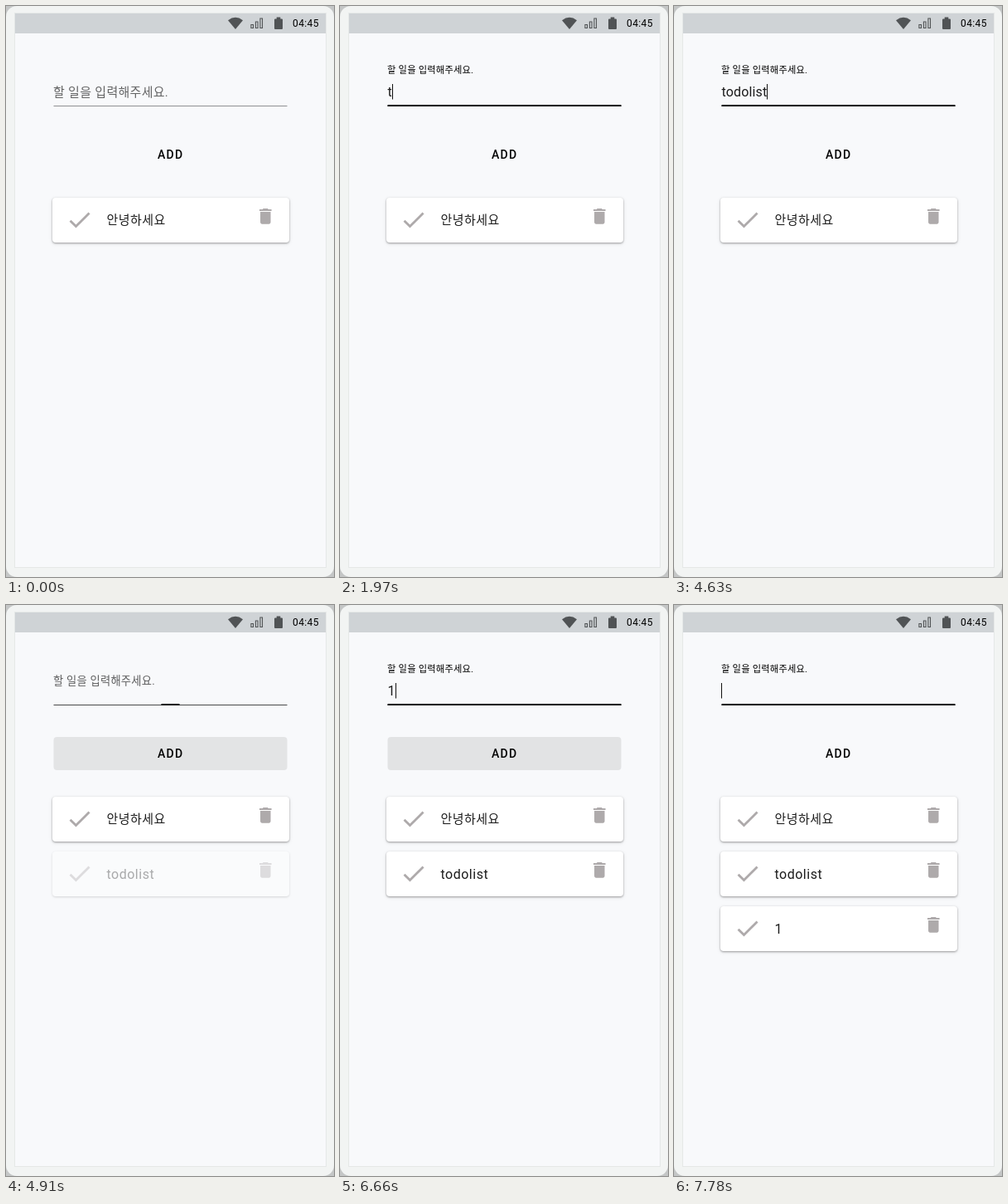
Write an HTML page that moves like this. It is 396x688 px and loops after 8000 ms.

```html
<!DOCTYPE html>
<html lang="ko">
<head>
<meta charset="utf-8">
<title>Todo app</title>
<style>
  html, body { margin: 0; width: 100%; height: 100%; overflow: hidden; background: #c4c6c6; }
  svg { display: block; }
  text { font-family: Roboto, "Noto Sans CJK KR", "Noto Sans CJK", sans-serif; fill: #000; white-space: pre; }
  .card { fill: #fff; filter: drop-shadow(0 1px 1px rgba(0,0,0,.32)) drop-shadow(0 1px 2px rgba(0,0,0,.1)); }
  .icon { fill: #aeaaab; }
  .item { font-size: 16px; letter-spacing: .5px; fill: #1c1c1c; }
  .ko { font-size: 15px; letter-spacing: .45px; }
</style>
</head>
<body>
<svg width="396" height="688" viewBox="0 0 396 688">
  <rect width="396" height="688" rx="13" fill="#f2f4f3"/>
  <rect x="10.5" y="8.5" width="376" height="668" fill="#f8f9fb" stroke="#e5e8e7"/>
  <rect x="11" y="9" width="375" height="24" fill="#cfd3d6"/>

  <g fill="#505355">
    <path d="M277 28 L268 17.2 Q277 10.4 286 17.2 Z"/>
    <path d="M325 15.5 Q324 15.5 324 16.5 V27 Q324 28 325 28 H333 Q334 28 334 27 V16.5 Q334 15.5 333 15.5 H331.3 V13.5 H326.7 V15.5 Z"/>
    <path d="M295.9 22.5 h2.6 v4 h-2.6z M301.4 19 h2.6 v7.5 h-2.6z M306.9 15 h2.6 v11.5 h-2.6z" fill="none" stroke="#505355" stroke-width="1.1"/>
  </g>
  <text x="346" y="25" font-size="12" letter-spacing=".4">04:45</text>

  <text id="label" font-size="15" letter-spacing=".29">할 일을 입력해주세요.</text>
  <text id="value" x="57.5" y="108.5" font-size="16" letter-spacing=".15" style="fill:#1c1c1c"></text>
  <rect id="caret" y="94" width="1" height="18.5" fill="#111"/>
  <rect id="base" x="57.5" y="120" width="282" height="1"/>
  <rect id="line" y="119" height="2"/>

  <rect id="shade" x="57.5" y="159" width="282" height="40" rx="4"/>
  <text x="183" y="184" font-size="14" font-weight="500" letter-spacing="1.25">ADD</text>

  <g id="list"></g>
</svg>
<script>
const LOOP = 8000, STEP = 70, PHASE = 10;
const $ = id => document.getElementById(id);
const clamp = v => Math.max(0, Math.min(1, v));
const mix = (a, b, k) => a + (b - a) * k;
const set = (el, attrs) => { for (const k in attrs) el.setAttribute(k, attrs[k]); };

function bezier(x1, y1, x2, y2) {
  const at = (a, b, u) => 3 * (1 - u) * (1 - u) * u * a + 3 * (1 - u) * u * u * b + u * u * u;
  return x => {
    if (x <= 0 || x >= 1) return clamp(x);
    let lo = 0, hi = 1;
    for (let i = 0; i < 24; i++) {
      const mid = (lo + hi) / 2;
      if (at(x1, x2, mid) < x) lo = mid; else hi = mid;
    }
    return at(y1, y2, lo);
  };
}
const easeOut = bezier(0, 0, .2, 1);
const ease = bezier(.25, .1, .25, 1);

// Times alternate on, off, on ...
const FOCUS = [490, 4782, 5682, 6830, 7575];
const FLOAT = [490, 4865, 5682, 6913, 7575];
const CARET = [490, 1480, 1550, 2810, 2880, 4070, 4630, 4780, 5682, 6240, 6310, 6830, 7575];
const TYPED = [
  [0, ''], [990, 'ㅅ'], [1550, ''], [1970, 't'], [2040, 'to'], [2180, 'tod'], [2250, 'todo'],
  [2880, 'todol'], [3230, 'todoli'], [3440, 'todolis'], [3580, 'todolist'], [4865, ''],
  [6310, '1'], [6913, '']
];
const PRESS = [[4690, 4902], [6650, 6950]];
const ITEMS = [['안녕하세요', -1000], ['todolist', 4865], ['1', 6913]];

const passed = (t, times) => times.filter(s => s <= t).length;
const isOn = (t, times) => passed(t, times) % 2 === 1;

function toggle(t, times) {
  const n = passed(t, times);
  if (!n) return 0;
  const k = easeOut((t - times[n - 1]) / 200);
  return n % 2 ? k : 1 - k;
}

const CHECK = 'M9 16.17 4.83 12l-1.42 1.41L9 19 21 7l-1.41-1.41z';
const BIN = 'M6 19c0 1.1.9 2 2 2h8c1.1 0 2-.9 2-2V7H6v12zM19 4h-3.5l-1-1h-5l-1 1H5v2h14V4z';

$('list').innerHTML = ITEMS.map(([name], i) => `
  <g transform="translate(0 ${231 + 66 * i})">
    <rect class="card" x="56" y="0" width="286" height="54" rx="4"/>
    <path class="icon" d="${CHECK}" transform="translate(71.7 9.6) scale(1.42)"/>
    <text class="item${i ? '' : ' ko'}" x="121.5" y="${i ? 32.5 : 32}">${name}</text>
    <path class="icon" d="${BIN}" transform="translate(300.8 9.8) scale(1.04)"/>
  </g>`).join('');
const rows = [...$('list').children];

function draw(t) {
  const focus = toggle(t, FOCUS), float = toggle(t, FLOAT);

  set($('label'), {
    transform: `translate(57 ${mix(108.5, 81.3, float)}) scale(${mix(1, .75, float)})`,
    'fill-opacity': mix(.6, 1, focus)
  });

  const value = $('value');
  value.textContent = TYPED.filter(([s]) => s <= t).pop()[1];
  const end = value.textContent ? value.getComputedTextLength() : 0;
  set($('caret'), { x: Math.round(57.4 + end), opacity: isOn(t, CARET) ? 1 : 0 });

  const w = 282 * focus;
  set($('line'), { x: 198.5 - w / 2, width: w });
  set($('base'), { opacity: focus > 0 ? .7 : .42 });

  let shade = 0;
  for (const [from, fade] of PRESS)
    if (t >= from) shade = .09 * (1 - clamp((t - fade) / 200));
  set($('shade'), { opacity: shade });

  rows.forEach((row, i) => set(row, { opacity: ease((t - ITEMS[i][1]) / 200) }));
}

// The screen refreshes in even steps
const start = performance.now();
function tick() {
  const t = (performance.now() - start) % LOOP;
  draw(Math.max(0, Math.floor((t - PHASE) / STEP) * STEP + PHASE));
  requestAnimationFrame(tick);
}
draw(0);
requestAnimationFrame(tick);
</script>
</body>
</html>
```
